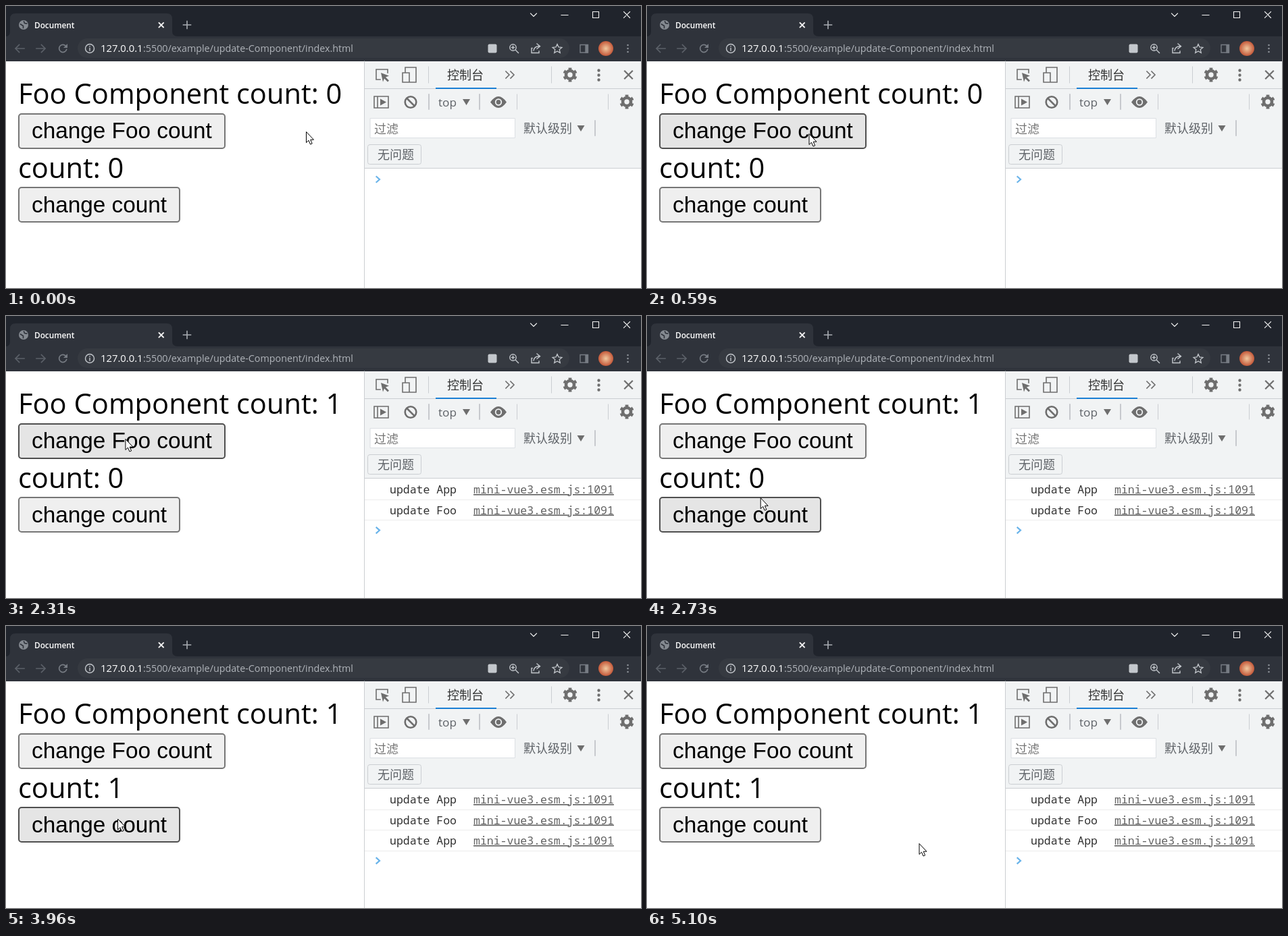
Animation of 940 by 418 pixels, one loop 5.13 s. Source, as an HTML page:

```html
<!DOCTYPE html>
<html lang="zh-CN">
<head>
<meta charset="utf-8">
<title>Document</title>
<style>
  html, body { margin: 0; width: 100%; height: 100%; overflow: hidden; background: #fff; }
  svg { display: block; width: 940px; height: 418px; }
  text { white-space: pre; font-family: "Open Sans", sans-serif; }
  .line { fill: none; stroke-linecap: square; }
  .big { font-size: 41.6px; }
  .btn rect { fill: #efefef; stroke: #767676; stroke-width: 2; }
  .btn.hover rect { fill: #e5e5e5; stroke: #4f4f4f; }
  .btn.press rect { fill: #f5f5f5; stroke: #8d8d8d; }
  .btn text { font: 33.33px "Liberation Sans", Arial, sans-serif; }
  .zh { font: 18px "Noto Sans CJK SC", "Noto Sans CJK", sans-serif; fill: #5f6368; }
  .log text { font: 16.5px "Noto Sans Mono", monospace; fill: #303030; }
  .log .link { fill: #626262; text-decoration: underline 1px; }
</style>
</head>
<body>
<svg viewBox="0 0 940 418">
  <defs>
    <g id="gear" fill="none" stroke="#6e6e6e">
      <circle r="6" stroke-width="4.6"/>
      <circle r="9" stroke-width="3.2" pathLength="12" stroke-dasharray="1" stroke-dashoffset="1.5"/>
    </g>
    <radialGradient id="photo"><stop stop-color="#f0c9a0"/><stop offset="1" stop-color="#c4593a"/></radialGradient>
  </defs>

  <!-- browser window -->
  <path fill="#20242c" d="M0 0H940V46H0Z"/>
  <path fill="#2f333b" d="M0 45H0Q6 45 6 37V19Q6 11 14 11H238Q246 11 246 19V37Q246 45 254 45H940V82H0Z"/>
  <rect x="106" y="48" width="728" height="29" rx="14.5" fill="#363a41"/>
  <g class="line" stroke="#858a91" stroke-width="1.3">
    <circle cx="26" cy="28" r="7" fill="#858a91" stroke="none"/>
    <path stroke="#2f333b" stroke-width="1.6" d="M21.5 27l4 2.5v3M26.500 23l1 2.500 3 .5"/>
  </g>
  <text x="42" y="33" font-size="11.8" font-weight="600" fill="#fff">Document</text>
  <g class="line" stroke="#f2f2f2">
    <path stroke-width="1.8" d="M226.500 25l6.500 6.500m0-6.500l-6.500 6.500"/>
    <path stroke="#a9adb3" stroke-width="1.6" d="M262.5 28h11M268 22.500v11"/>
    <path stroke-width="1.1" d="M776.500 11l4.500 4.500 4.500-4.500M822 13.500h10M868.500 8.500h9v9h-9ZM914.500 8.500l9 9m0-9l-9 9"/>
  </g>
  <g class="line" stroke="#5b6068" stroke-width="1.7">
    <path d="M27 63H14m5.500-5.500L14 63l5.500 5.500M45 63h13m-5.500-5.500L58 63l-5.500 5.500"/>
    <path stroke="#777c84" d="M89 60a5.600 5.600 0 1 0 .6 4.500"/>
    <path fill="#777c84" stroke="none" d="M91 56v6h-6Z"/>
  </g>
  <g class="line" stroke="#c3c7cc" stroke-width="1.4">
    <circle cx="124" cy="63" r="6.500"/>
    <path d="M124 62.500v3.500M124 59.700v.1"/>
    <rect x="713.500" y="56.500" width="13" height="13" rx="2" fill="#c3c7cc" stroke="none"/>
    <circle cx="750.500" cy="61.500" r="4.700"/>
    <path d="M754.500 65.500l4 4M748.500 61.500h4m-2-2v4"/>
    <path d="M779 62.500h-1v7h11v-2.500M781 66q1-6 8-6.500M786 56l4.500 3.700-4.500 3.600"/>
    <path stroke-width="1.3" d="M816 56.500l2 4.500 4.900.4-3.700 3.200 1.100 4.800-4.300-2.500-4.300 2.500 1.100-4.800-3.700-3.200 4.900-.4Z"/>
    <g stroke="#777c84"><path d="M850 57.500h11.500v11.500h-11.500Z"/><path fill="#777c84" d="M858 58h3v11h-3Z"/></g>
    <path stroke="#8d9299" stroke-width="2.600" stroke-linecap="round" d="M920.500 58v.01m0 5v.01m0 5v.01"/>
  </g>
  <text x="140" y="68" font-size="14.8" font-weight="500" fill="#fff">127.0.0.1</text>
  <text x="203" y="68" font-size="14.3" fill="#b0b4ba">:5500/example/update-Component/index.html</text>
  <circle cx="888" cy="63" r="11" fill="url(#photo)"/>

  <!-- page -->
  <path fill="#fff" d="M0 82H940V418H0Z"/>
  <text class="big" x="18" y="144.5" id="fooText"></text>
  <g class="btn" id="fooBtn"><rect x="19" y="160" width="305" height="51" rx="4"/><text x="38" y="196">change Foo count</text></g>
  <text class="big" x="18" y="254.5" id="countText"></text>
  <g class="btn" id="countBtn"><rect x="19" y="269" width="238" height="51" rx="4"/><text x="38" y="306">change count</text></g>

  <!-- developer tools -->
  <path fill="#f1f3f4" d="M531 82H940V241H531Z"/>
  <g class="line" stroke="#cbced2">
    <path d="M530.500 82V418M531 122.500H940M531 240.500H940"/>
    <path d="M625.500 90v24M807.500 90v24M756.500 131v22M891.500 131v22"/>
    <path stroke="#b9bcc0" stroke-width="1.500" d="M626 131v22M701 131v22M872 170v22"/>
    <path fill="#fff" stroke="#dcdfe3" d="M539.500 166.500h214v29h-214Z"/>
    <rect x="535.500" y="205.500" width="79" height="29" rx="3"/>
  </g>
  <path fill="#1a7fd4" d="M636 121h90v2h-90Z"/>
  <g class="line" stroke="#6e6e6e" stroke-width="1.600">
    <path d="M554 109h-6V94h17v5"/>
    <path fill="#6e6e6e" stroke="none" d="M555 99l12 4.500-5 2 5 5-2 2-5-5-2 5Z"/>
    <path d="M591 99v-8h16v22h-9M587 99h10v14h-10Z"/>
    <path d="M740 97l5 5-5 5M747 97l5 5-5 5"/>
    <path stroke-width="2.200" d="M916 96.500l11 11m0-11l-11 11"/>
    <path stroke-width="4.400" stroke-linecap="round" d="M877.500 95.500v.01m0 7v.01m0 7v.01"/>
    <path d="M545 134h21v17h-21ZM550 134v17"/>
    <path fill="#6e6e6e" stroke="none" d="M554 137.500l9 5-9 5Z"/>
    <circle cx="599" cy="142.500" r="8.300" stroke-width="2.600"/>
    <path stroke-width="2.600" d="M593.500 137l11 11"/>
    <path fill="#6e6e6e" stroke="none" d="M676 138h11l-5.500 9ZM845.500 177h11l-5.500 9ZM717 142.500q12-17 24 0q-12 17-24 0Z"/>
    <circle cx="729" cy="142.500" r="4.300" stroke="#f1f3f4" stroke-width="1.800"/>
  </g>
  <use href="#gear" x="835" y="102"/>
  <use href="#gear" x="919" y="142"/>
  <text class="zh" x="653" y="108.500" style="fill:#333">控制台</text>
  <text x="640" y="149" font-size="17.200" fill="#5f6368">top</text>
  <text class="zh" x="545" y="189" style="fill:#757575">过滤</text>
  <text class="zh" x="766" y="187.500">默认级别</text>
  <text class="zh" x="550" y="227">无问题</text>
  <g id="logs"></g>
  <path id="prompt" class="line" stroke="#6ab4ea" stroke-width="2.2" d="M548.500 -4l4.500 4-4.500 4"/>

  <!-- pointer -->
  <circle id="glow" r="12" fill="#f0e62c" opacity=".75"/>
  <path id="cursor" fill="#fff" stroke="#000" d="M.5.5V16.500L4 13.200 6.500 19l2.700-1.100L6.700 12.200H11.500Z"/>
</svg>
<script>
const LOOP = 5130;
const $ = id => document.getElementById(id);
const move = (el, x, y) => el.setAttribute('transform', `translate(${x} ${y})`);
const within = (t, a, b) => t >= a && t < b;

// time, x, y, downward bow of the way to the next stop
const path = [
  [30, 444, 186, 8], [590, 239.5, 189, 0], [880, 176.5, 181, 0], [2280, 176.5, 181, 0],
  [2820, 167, 276, 0], [3040, 167, 285, 0], [3350, 167, 285, 0], [3380, 165, 285.5, 0],
  [4870, 165, 285.5, 0], [5100, 402.5, 322, 0]
];

$('logs').innerHTML = ['App', 'Foo', 'App'].map((name, i) => {
  const y = 263 + 30.5 * i;
  return `<g class="log"><path stroke="#ececec" d="M531 ${Math.round(y + 8.5) + .5}H940"/>
    <text x="568" y="${y}">update ${name}</text><text class="link" x="692" y="${y}">mini-vue3.esm.js:1091</text></g>`;
}).join('');
const logs = [...$('logs').children];

function pointerAt(t) {
  if (t <= path[0][0]) return path[0].slice(1, 3);
  const i = path.findIndex(p => p[0] > t);
  if (i < 0) return path[path.length - 1].slice(1, 3);
  const [t0, x0, y0, bow] = path[i - 1], [t1, x1, y1] = path[i];
  const u = (t - t0) / (t1 - t0), e = u * u * (3 - 2 * u);
  return [x0 + (x1 - x0) * e, y0 + (y1 - y0) * e + bow * Math.sin(Math.PI * e)];
}

function setButton(id, [x, y], right, top, pressed) {
  const hover = x >= 18 && x < right && y >= top && y < top + 53;
  $(id).setAttribute('class', 'btn' + (pressed ? ' press' : hover ? ' hover' : ''));
}

function draw(t) {
  const tip = pointerAt(t);
  const foo = t >= 1490 ? 1 : 0, count = t >= 3960 ? 1 : 0;
  const rows = foo * 2 + count;
  $('fooText').textContent = 'Foo Component count: ' + foo;
  $('countText').textContent = 'count: ' + count;
  setButton('fooBtn', tip, 325, 159, within(t, 1430, 1490));
  setButton('countBtn', tip, 258, 268, within(t, 3830, 3960));
  logs.forEach((row, i) => row.style.display = i < rows ? '' : 'none');
  move($('prompt'), 0, 257 + 30.3 * rows);
  move($('cursor'), ...tip);
  move($('glow'), ...tip);
  $('glow').style.display = within(t, 1380, 1540) || within(t, 3830, 3960) ? '' : 'none';
}

const start = performance.now();
function tick() {
  draw((performance.now() - start) % LOOP);
  requestAnimationFrame(tick);
}
tick();
</script>
</body>
</html>
```
